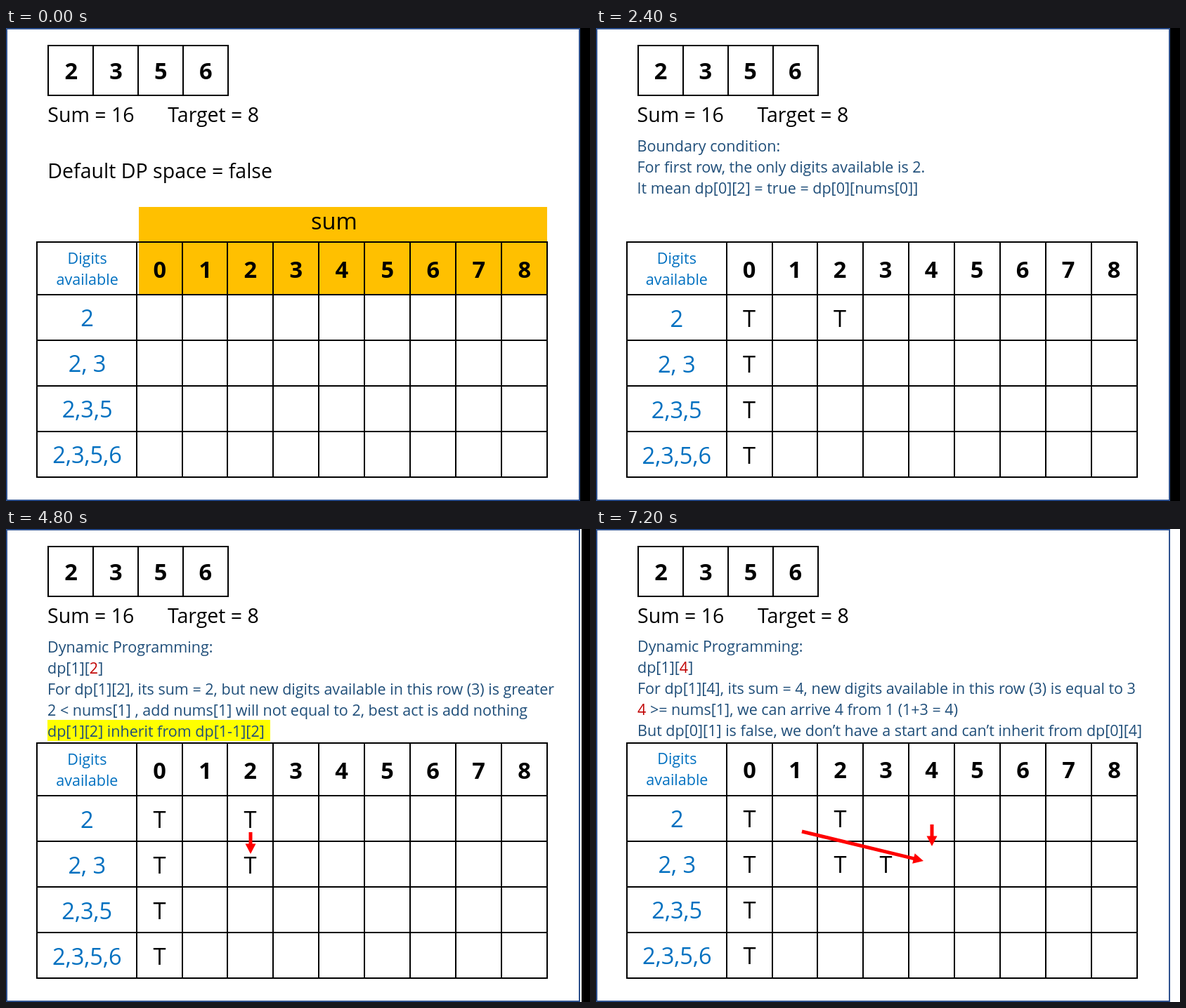
An HTML page with a canvas for the animation above (8000 ms loop, 831x674 px).

```html
<!DOCTYPE html>
<html lang="en">
<head>
<meta charset="utf-8">
<title>Subset sum table</title>
<style>
  html, body { margin: 0; width: 100%; height: 100%; overflow: hidden; background: #fff; }
  canvas { display: block; }
</style>
</head>
<body>
<canvas id="stage" width="831" height="674"></canvas>
<script>
const ctx = document.getElementById('stage').getContext('2d');
const LOOP = 8000, STEP = 1200;
const BLUE = '#0070c0', NAVY = '#1f4e79', RED = '#c00000';
const SMALL = 21.5, MEDIUM = 28.5, LARGE = 32.6;

// Text between asterisks is red; arrows are [x1, y1, x2, y2].
const steps = [
  { dx: .3, dy: 0, edge: 817, sumBand: true },
  { dx: 0, dy: 0, edge: 817, notes: [
    'Boundary condition:',
    'For each row, we can always choose nothing from the available digits.',
    'It means every cell in column[0] is true'] },
  { dx: -.5, dy: .4, edge: 817, notes: [
    'Boundary condition:',
    'For first row, the only digits available is 2.',
    'It mean dp[0][2] = true = dp[0][nums[0]]'] },
  { dx: 0, dy: .4, edge: 819, marked: true, notes: [
    'Dynamic Programming:',
    'Start from dp[1][1]',
    'For dp[1][1], its sum = 1, but new digits available in this row (3) is greater',
    '1 < (nums[1] = 3), add nums[1] will not equal to 1,',
    'dp[1][1] inherit from dp[1-1][1]'],
    arrows: [[281, 410, 281, 475]] },
  { dx: 0, dy: .4, edge: 819, marked: true, notes: [
    'Dynamic Programming:',
    'dp[1][*2*]',
    'For dp[1][2], its sum = 2, but new digits available in this row (3) is greater',
    '2 < nums[1] , add nums[1] will not equal to 2, best act is add nothing',
    'dp[1][2] inherit from dp[1-1][2]'],
    arrows: [[348, 432, 348, 463]] },
  { dx: -.5, dy: .4, edge: 831, notes: [
    'Dynamic Programming:',
    'dp[1][*3*]',
    'For dp[1][3], its sum = 3, new digits available in this row (3) is equal to 3',
    '3 >= nums[1] , we arrive 3 by start from dp[0][0] = 0  and add nums[1] = 3'],
    arrows: [[218, 432, 390, 474], [410, 432, 410, 463]] },
  { dx: 0, dy: -.5, edge: 831, notes: [
    'Dynamic Programming:',
    'dp[1][*4*]',
    'For dp[1][4], its sum = 4, new digits available in this row (3) is equal to 3',
    '*4* >= nums[1], we can arrive 4 from 1 (1+3 = 4)',
    'But dp[0][1] is false, we don’t have a start and can’t inherit from dp[0][4]'],
    arrows: [[293, 431, 466, 473], [478, 421, 478, 452]] }
];

const columnX = i => Math.round(185.7 + 64.88 * i);
const rowY = i => 380 + 65 * i;

function box(x, y, w, h, color) {
  ctx.fillStyle = color;
  ctx.fillRect(x, y, w, h);
}

function lines(xs, ys) {
  const left = xs[0], right = xs[xs.length - 1];
  const top = ys[0], bottom = ys[ys.length - 1];
  for (const x of xs) box(x - 1, top - 1, 2, bottom - top + 2, '#000');
  for (const y of ys) box(left - 1, y - 1, right - left + 2, 2, '#000');
}

function text(str, x, y, size, color = '#000', align = 'left', weight = 400) {
  ctx.font = `${weight} ${size}px "Open Sans", sans-serif`;
  ctx.textAlign = align;
  ctx.fillStyle = color;
  ctx.fillText(str, x, y);
}

const centered = (str, x, y, size, color, weight) => text(str, x, y, size, color, 'center', weight);

function note(str, x, y) {
  str.split('*').forEach((part, i) => {
    text(part, x, y, SMALL, i % 2 ? RED : NAVY);
    x += ctx.measureText(part).width;
  });
}

function arrow([x1, y1, x2, y2]) {
  const length = Math.hypot(x2 - x1, y2 - y1);
  ctx.save();
  ctx.translate(x1, y1);
  ctx.rotate(Math.atan2(y2 - y1, x2 - x1));
  box(0, -2.5, length - 13, 5, '#f00');
  ctx.beginPath();
  ctx.moveTo(length, 0);
  ctx.lineTo(length - 14.5, -7.5);
  ctx.lineTo(length - 14.5, 7.5);
  ctx.fill();
  ctx.restore();
}

function drawGrids() {
  const columns = Array.from({ length: 10 }, (_, i) => columnX(i));
  lines([60, 124, 188, 252, 316], [25, 96]);
  lines([44, ...columns], [305, ...[0, 1, 2, 3, 4].map(rowY)]);
}

function drawLabels(index) {
  [2, 3, 5, 6].forEach((n, i) => centered(n, 92.5 + 63.8 * i, 73, LARGE, '#000', 700));
  text('Sum = 16', 59, 134, MEDIUM);
  text('Target = 8', 230, 134, MEDIUM);
  centered('Digits', 115.3, 335.5, SMALL, BLUE);
  centered('available', 115.3, 365.5, SMALL, BLUE);
  ['2', '2, 3', '2,3,5', '2,3,5,6'].forEach((s, i) =>
    centered(s, 115.3, rowY(i) + 45.3, LARGE, BLUE));
  for (let i = 0; i < 9; i++)
    centered(i, columnX(i) + 32.5, 355.5, LARGE, '#000', 700);

  const mark = (row, col) => centered('T', columnX(col) + 32.5, rowY(row) + 45.3, LARGE);
  if (index >= 1) for (let row = 0; row < 4; row++) mark(row, 0);
  if (index >= 2) mark(0, 2);
  if (index >= 4) mark(1, 2);
  if (index >= 5) mark(1, 3);
}

function draw(index) {
  const { dx, dy, edge, sumBand, marked, notes = [], arrows = [] } = steps[index];
  box(0, 0, 831, 674, '#fff');
  box(edge, 0, 831 - edge, 674, '#000');
  ctx.strokeStyle = '#2f528f';
  ctx.lineWidth = 2;
  ctx.strokeRect(1, 1, 815, 672);
  if (sumBand) box(189, 255, 581, 125, '#ffc000');
  if (marked) box(59, 272, 317, 30, '#ff0');
  drawGrids();

  ctx.save();
  ctx.translate(dx, dy);
  if (sumBand) {
    centered('sum', 466.5, 287, LARGE);
    text('Default DP space = false', 59, 214, MEDIUM);
  }
  notes.forEach((s, i) => note(s, 59, 175.5 + 30 * i));
  drawLabels(index);
  ctx.restore();
  arrows.forEach(arrow);
}

const start = performance.now();
function tick() {
  draw(Math.floor((performance.now() - start) % LOOP / STEP));
  requestAnimationFrame(tick);
}
tick();
</script>
</body>
</html>
```
